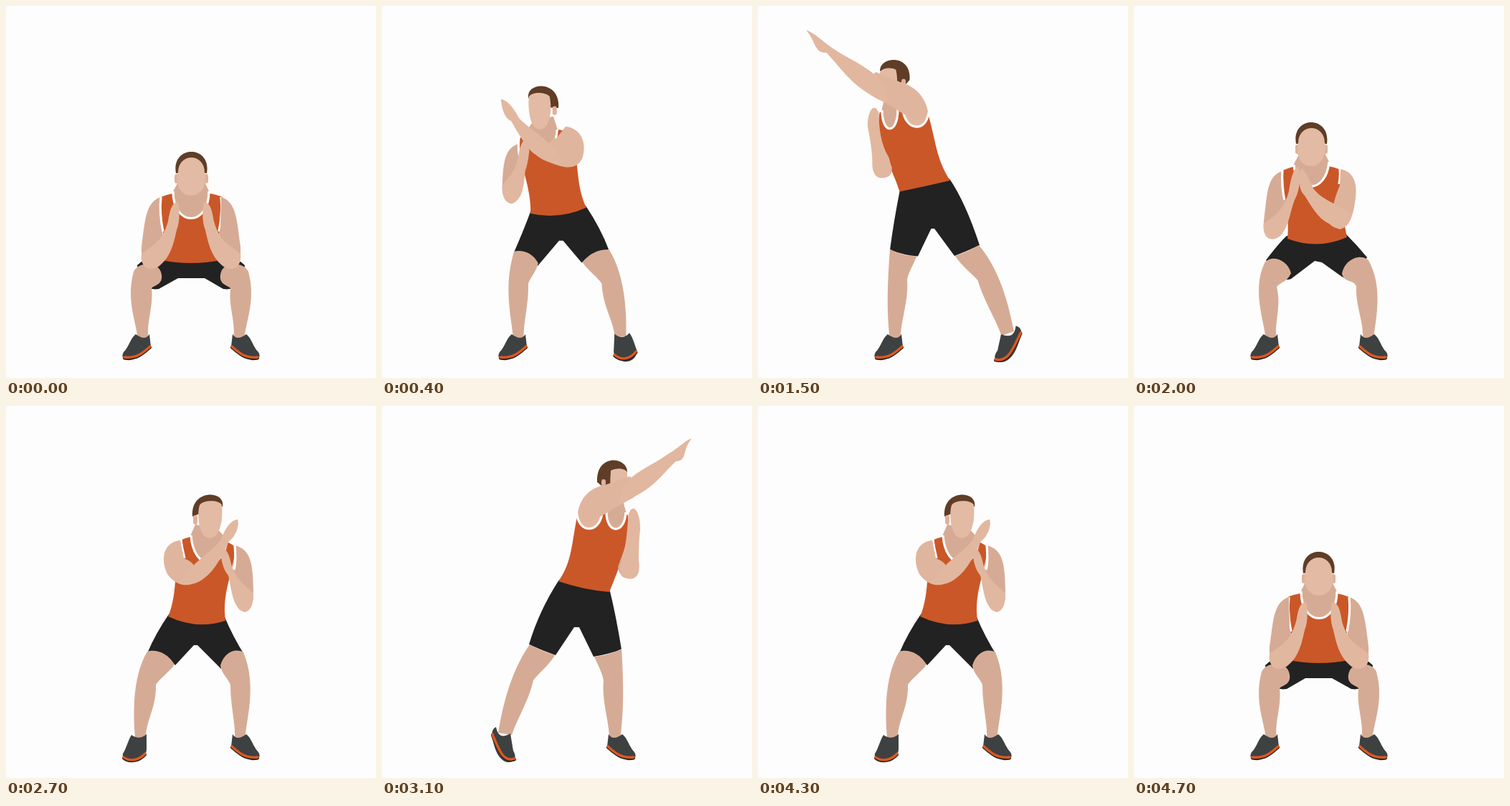
Animation of 516 by 518 pixels, one loop 4.8 s. Source, as an HTML page without scripts:

```html
<!DOCTYPE html>
<html lang="en">
<head>
<meta charset="utf-8">
<title>Squat and reach</title>
<style>
html, body { margin: 0; width: 100%; height: 100%; overflow: hidden; background: #fdfdfd; }
svg { display: block; width: 516px; height: 518px; }

/* Poses: s squat, e low rise, b half rise, c reach, f long reach, p peak */
path { d: var(--s); animation: move 2.4s infinite; }
.still path { animation: none; }
#man { animation: flip 4.8s step-end infinite; }

.light { fill: #e2b79f; }
.dark { fill: #d6ab95; }
.tint { animation: move 2.4s infinite, tint 2.4s linear infinite; }
.trim { fill: none; stroke: #fff; stroke-width: 3.2; }
.trim.dark { fill: #d6ab95; }
.trim.light { fill: #e2b79f; }
.sole { fill: none; stroke: #e0571f; stroke-width: 3.4; stroke-linecap: round; }
.edge { stroke: #262626; stroke-width: 4; transform: translateY(1.4px); }
.shoe { fill: #3e4141; }
.hair { fill: #5f3d26; }
.ears { fill: none; stroke: #deb19a; stroke-width: 6; stroke-linecap: round; }
.face { fill: #e3baa3; }
.shorts { fill: #222; }
.shirt { fill: #ca5728; }

.shorts {
  --s: path("M210 346 Q258 354 306 346 Q324 352 333 361 Q330 398 303 394 L277 379 L240 379 L213 394 Q186 398 183 361 Q192 352 210 346Z");
  --e: path("M213 320 Q256 328 296 318 Q312 334 325 350 Q304 386 290 377 L262 357 L252 355 L219 380 Q204 386 184 354 Q202 330 213 320Z");
  --b: path("M211 294 Q250 300 289 290 Q308 318 318 342 Q298 340 280 361 L254 333 L249 333 L216 366 Q206 346 184 346 Q200 320 211 294Z");
  --c: path("M199 254 Q235 250 269 242 Q297 285 311 332 Q294 340 274 347 L248 308 L241 308 L221 349 Q201 346 182 339 Q190 290 199 254Z");
  --f: path("M198 253 Q232 246 265 239 Q282 262 307 334 Q289 343 274 349 L244 312 L242 312 L225 348 Q205 348 186 340 Q190 300 198 253Z");
}
.leg1 {
  --s: path("M178 370 C184 356 214 354 217 374 C219 388 208 388 203 393 C206 420 195 440 199 465 L184 465 C182 440 167 410 178 370Z");
  --e: path("M182 358 C190 346 214 352 219 372 C214 384 205 384 199 391 C206 420 195 440 199 465 L184 465 C182 440 164 396 182 358Z");
  --b: path("M185 343 C196 337 211 342 217 361 C216 372 206 380 203 388 C203 420 196 440 197 465 L183 465 C182 440 165 390 185 343Z");
  --c: path("M182 338 C195 345 208 348 220 349 C215 360 209 372 207 382 C210 410 199 440 199 465 L184 465 C180 430 178 400 182 338Z");
  --f: path("M186 339 C198 346 211 348 223 348 C218 360 211 370 209 380 C211 410 199 435 198 465 L184 465 C180 430 181 400 186 339Z");
}
.leg2 {
  --s: path("M338 370 C332 356 302 354 299 374 C297 388 308 388 313 393 C310 420 321 440 317 465 L332 465 C334 440 349 410 338 370Z");
  --e: path("M327 354 C316 344 294 352 290 373 C294 386 305 380 310 390 C309 420 321 440 319 465 L334 465 C336 440 349 394 327 354Z");
  --b: path("M319 342 C308 338 291 343 281 360 C288 370 300 378 307 388 C306 420 322 440 321 462 L336 462 C338 440 342 380 319 342Z");
  --c: path("M310 332 C300 338 288 343 275 347 C282 360 298 372 305 382 C311 410 330 440 335 458 L354 455 C350 430 340 375 310 332Z");
  --f: path("M306 334 C297 340 286 345 275 349 C283 362 300 374 308 382 C316 405 337 440 344 460 L360 451 C353 425 342 368 306 334Z");
}
.shoe {
  --s: path("M316 457 Q322 467 335 457 C343 463 344 474 352 482 C358 492 346 496 336 491 C328 486 318 480 314 474Z");
  --b: path("M320 457 Q330 466 341 458 C346 466 348 476 353 484 C355 493 346 497 337 495 C328 492 320 486 320 478Z");
  --c: path("M337 456 Q354 466 357 447 C362 449 364 455 362 464 C358 480 354 492 342 496 C332 497 327 490 333 480Z");
  --f: path("M341 458 Q361 464 362 444 C368 443 375 450 371 457 C364 474 358 490 344 495 C332 499 325 490 335 480Z");
}
.sole {
  --s: path("M315 474 C324 482 333 491 351 489");
  --b: path("M322 484 C330 493 343 496 352 489");
  --c: path("M331 491 C346 496 352 482 362 457");
  --f: path("M331 493 C350 497 357 478 371 452");
}
.shirt {
  --s: path("M216 266 Q258 250 302 266 C304 300 290 330 299 354 Q258 362 217 354 C226 330 214 300 216 266Z");
  --e: path("M207 229 Q247 212 288 228 C290 260 290 290 297 322 Q256 340 214 324 C218 290 206 260 207 229Z");
  --b: path("M196 196 Q235 170 273 187 C282 220 276 260 290 293 Q250 312 210 299 C216 260 198 230 196 196Z");
  --c: path("M173 152 Q205 138 243 150 C252 190 250 215 270 244 Q235 256 199 259 C186 225 169 190 173 152Z");
  --f: path("M166 145 Q200 130 230 146 C244 182 246 211 266 242 Q232 246 196 258 C186 215 155 198 166 145Z");
}
.neck {
  --s: path("M240 245 L277 245 L284 260 L232 260Z");
  --e: path("M231 205 L266 205 L273 219 L222 222Z");
  --b: path("M222 170 L252 165 L259 181 L207 187Z");
  --c: path("M182 125 L200 120 L204 150 L175 150Z");
  --f: path("M172 125 L187 122 L188 144 L169 144Z");
}
.collar {
  --s: path("M233 258 C233 308 283 308 283 258");
  --e: path("M223 221 C226 262 268 262 272 217");
  --b: path("M208 186 C212 230 255 230 258 180");
  --c: path("M176 148 C178 180 203 178 203 148");
  --f: path("M170 142 C168 180 187 180 187 140");
}
.hole1 {
  --s: path("M216 266 C214 285 216 300 219 314");
  --e: path("M207 228 C206 240 207 260 210 270");
  --b: path("M197 194 C196 205 196 220 198 228");
  --c: path("M173 150 C173 150 173 150 173 150");
  --f: path("M166 145 C166 145 166 145 166 145");
}
.hole2 {
  --s: path("M300 266 C302 285 300 300 297 314");
  --e: path("M287 226 C288 235 287 242 286 248");
  --b: path("M272 186 C271 196 269 204 267 212");
  --c: path("M244 150 C242 178 212 178 209 148");
  --f: path("M231 146 C230 173 199 173 195 140");
}
.hair {
  --s: path("M237 233 C230 193 287 193 280 233 L258 230Z");
  --e: path("M226 192 C219 152 275 152 269 192 L247 190Z");
  --b: path("M214 140 C210 116 260 116 256 154 L246 150Z");
  --c: path("M174 92 C174 70 218 66 216 106 L204 116Z");
  --f: path("M166 88 C166 70 210 66 207 100 L199 112Z");
}
.ears {
  --s: path("M238 237 L238 244 M279 237 L279 244");
  --e: path("M228 196 L228 203 M267 196 L267 203");
  --b: path("M219 156 L219 160 M252 155 L252 162");
  --c: path("M190 110 L190 112 M207 105 L207 109");
  --f: path("M182 104 L182 106 M199 104 L199 109");
}
.face {
  --s: path("M240 232 C240 204 277 204 277 232 C281 250 272 264 258 264 C244 264 236 250 240 232Z");
  --e: path("M229 191 C229 163 266 163 266 191 C269 209 260 223 247 223 C233 223 225 209 229 191Z");
  --b: path("M215 138 C218 131 240 130 246 138 C250 150 248 184 232 184 C218 184 213 160 215 138Z");
  --c: path("M174 92 C178 86 190 86 197 90 C198 108 200 128 188 136 C174 138 174 110 174 92Z");
  --f: path("M166 92 C170 86 182 84 188 88 C193 100 190 126 182 132 C168 136 164 112 166 92Z");
}
.upper1 {
  --s: path("M216 266 C194 273 194 300 189 335 C188 348 192 360 202 362 C216 350 222 330 217 308Z");
  --e: path("M207 230 C185 236 186 262 181 300 C179 312 184 322 194 324 C206 316 214 300 211 270Z");
  --b: path("M197 194 C172 200 172 225 171 262 C171 278 176 286 184 287 C196 280 206 260 199 225Z");
  --c: path("M173 185 C165 190 160 205 158 215 C156 232 162 240 172 240 C182 240 186 232 187 224Z");
  --f: path("M166 185 C162 190 162 205 162 215 C162 232 168 238 176 238 C186 238 188 234 187 226Z");
}
.fore1 {
  --s: path("M189 345 C186 366 204 372 216 360 C230 348 234 330 238 312 C243 300 242 282 240 274 C230 272 228 290 226 300 C218 328 206 332 189 345Z");
  --e: path("M181 302 C178 324 192 330 204 320 C216 308 218 285 224 270 C231 258 234 235 229 224 C222 224 218 245 216 258 C210 280 198 294 181 302Z");
  --b: path("M171 260 C170 282 182 290 190 284 C202 272 202 250 206 236 C214 228 218 208 216 196 C208 198 204 210 202 220 C196 240 186 248 171 260Z");
  --c: path("M158 218 C155 236 164 243 174 240 C186 238 186 230 181 210 C174 190 174 165 172 150 C166 134 156 146 156 172 C158 190 158 205 158 218Z");
  --f: path("M161 215 C162 234 170 240 178 238 C190 236 190 230 184 212 C168 195 163 172 165 148 C160 132 148 144 150 166 C156 185 160 200 161 215Z");
}
.upper2 {
  --s: path("M300 266 C322 273 322 300 327 335 C328 348 324 360 314 362 C300 350 294 330 299 308Z");
  --e: path("M288 227 C312 232 312 256 307 280 C304 298 296 310 286 311 C274 300 274 280 287 250Z");
  --b: path("M273 187 C298 190 300 215 292 232 C284 246 270 252 258 248 C246 240 246 220 268 212Z");
  --c: path("M205 110 C228 114 240 130 243 148 C236 178 210 150 166 128 C160 115 162 102 171 98Z");
  --f: path("M192 102 C214 110 228 128 231 146 C224 174 198 145 158 125 C150 108 150 92 158 86Z");
  --p: path("M188 100 C212 109 227 127 231 146 C224 174 195 144 154 123 C146 106 146 90 152 83Z");
}
.fore2 {
  --s: path("M327 345 C330 366 312 372 300 360 C286 348 282 330 278 312 C273 300 274 282 276 274 C286 272 288 290 290 300 C298 328 310 332 327 345Z");
  --e: path("M304 290 C300 312 284 315 272 303 C256 296 246 276 238 264 C228 254 230 236 233 226 C240 230 246 246 250 254 C264 272 282 274 304 290Z");
  --b: path("M276 246 C266 252 250 248 240 240 C224 228 214 208 205 188 C196 182 190 166 193 158 C202 158 212 172 216 186 C232 206 250 212 276 246Z");
  --c: path("M185 136 C175 134 160 124 150 118 C132 106 122 92 106 77 C90 76 98 62 84 45 C94 48 104 60 116 66 C145 88 185 96 185 136Z");
  --f: path("M175 132 C165 132 148 121 135 110 C118 96 104 76 85 53 C66 56 64 36 50 22 C60 25 74 36 86 47 C120 72 178 86 175 132Z");
  --p: path("M170 130 C158 128 141 117 128 106 C111 92 97 72 77 49 C58 52 56 32 42 18 C52 21 66 32 78 43 C112 68 172 82 170 130Z");
}

/* Ten drawings a second */
@keyframes move {
  0% { d: var(--s); animation-timing-function: steps(2); }
  8.3333% { d: var(--e, var(--s)); animation-timing-function: steps(1); }
  12.5% { d: var(--b); animation-timing-function: steps(4); }
  29.1667% { d: var(--c); animation-timing-function: steps(2); }
  37.5% { d: var(--f); animation-timing-function: steps(2); }
  45.8333% { d: var(--p, var(--f)); animation-timing-function: steps(1); }
  50% { d: var(--p, var(--f)); animation-timing-function: steps(2); }
  58.3333% { d: var(--f); animation-timing-function: steps(2); }
  66.6667% { d: var(--c); animation-timing-function: steps(3); }
  79.1667% { d: var(--b); animation-timing-function: steps(1); }
  83.3333% { d: var(--e, var(--s)); animation-timing-function: steps(3); }
  95.8333%, 100% { d: var(--s); animation-timing-function: steps(1); }
}
@keyframes tint {
  0%, 95% { fill: #d6ab95; }
  12%, 80% { fill: #e0b59e; }
  100% { fill: #d6ab95; }
}
@keyframes flip {
  0% { transform: none; }
  50%, 100% { transform: translateX(516px) scaleX(-1); }
}
</style>
</head>
<body>
<svg viewBox="0 0 516 518">
  <g id="man">
    <path class="shorts"/>
    <path class="leg1 dark"/>
    <path class="leg2 dark"/>
    <g class="still" transform="translate(516) scale(-1 1)">
      <path class="shoe"/>
      <path class="sole edge"/>
      <path class="sole"/>
    </g>
    <path class="shoe"/>
    <path class="sole edge"/>
    <path class="sole"/>
    <path class="shirt"/>
    <path class="neck dark"/>
    <path class="collar trim dark"/>
    <path class="hair"/>
    <path class="ears"/>
    <path class="face"/>
    <path class="upper1 dark"/>
    <path class="hole1 trim"/>
    <path class="hole2 trim light"/>
    <path class="upper2 tint"/>
    <path class="fore1 light"/>
    <path class="fore2 light"/>
  </g>
</svg>
</body>
</html>
```
